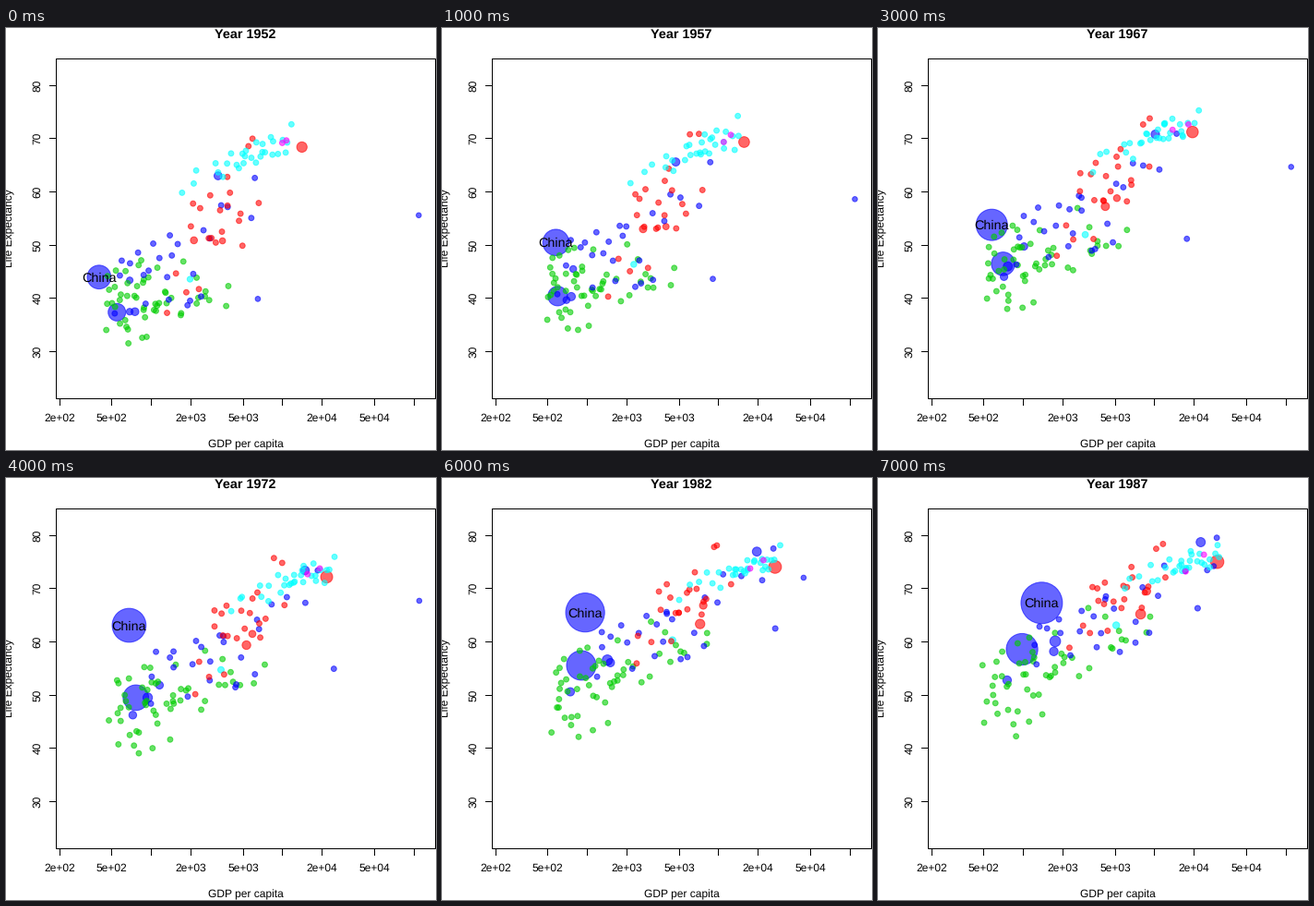
A matplotlib script for the animation above (8000 ms loop, 466 px wide and 457 px high).

```python
import numpy as np
import matplotlib.pyplot as plt
from matplotlib.animation import FuncAnimation

plt.rcParams["text.hinting"] = "none"

W, H, DPI = 466, 457, 100
PT = 72 / DPI
STEPS = 8
ALPHA = 0.6
SANS = "Liberation Sans"

COLORS = {
    "africa": (0, 205 / 255, 0),
    "americas": (1, 0, 0),
    "asia": (0, 0, 1),
    "europe": (0, 1, 1),
    "oceania": (1, 0, 1),
}

# continent, (first, last) population in millions, key points (step, GDP, life expectancy)
BUBBLES = [
    ("asia", (556, 1084), [(0, 400, 44), (1, 576, 50.5), (2, 488, 44.5),
                           (4, 677, 63.1), (6, 962, 65.5), (7, 1379, 67.3)]),
    ("asia", (372, 788), [(0, 547, 37.4), (7, 977, 58.6)]),
    ("americas", (157, 243), [(0, 13990, 68.4), (7, 29884, 75)]),
    ("asia", (86, 122), [(0, 3217, 63), (4, 14779, 73.4), (7, 22376, 78.7)]),
    ("asia", (82, 169), [(0, 750, 37.5), (3, 762, 46), (7, 1748, 60.1)]),
    ("americas", (57, 143), [(0, 2109, 50.9), (5, 6660, 61.5), (7, 7807, 65.2)]),
    ("americas", (30, 80), [(0, 3478, 50.8), (7, 8688, 69.5)]),
    ("asia", (41, 105), [(0, 685, 43.4), (7, 1705, 58.2)]),
    ("asia", (47, 104), [(0, 684, 37.5), (7, 752, 52.8)]),
    ("europe", (22, 53), [(0, 1969, 43.6), (7, 5089, 63.1)]),
    ("asia", (4, 15), [(0, 6460, 39.9), (5, 34168, 58.7), (7, 21198, 66.3)]),
    ("asia", (1, 2), [(0, 108382, 55.6), (4, 109348, 67.7), (7, 28118, 74.2)]),
]

# continent, count, skew, then (first, last) of: mean log GDP, its spread,
# mean life expectancy, its slope along GDP, its scatter
CROWDS = [
    ("africa", 52, 0.25, (2.99, 3.15), (0.25, 0.34), (39, 53.5), (1, 4.5), (4.3, 5)),
    ("asia", 25, 0.1, (3.18, 3.66), (0.3, 0.4), (47.5, 65), (4.5, 5), (5.5, 4)),
    ("americas", 22, 0, (3.5, 3.74), (0.2, 0.2), (53.5, 68.5), (5, 3.3), (5, 2.8)),
    ("europe", 29, -0.15, (3.74, 4.2), (0.23, 0.2), (65.8, 73.8), (3.2, 2.2), (1.7, 1.2)),
    ("oceania", 2, 0, (4.01, 4.31), (0.01, 0.03), (69.2, 75.3), (0.1, 0.8), (0.1, 0.2)),
]

rng = np.random.default_rng(1952)
steps = np.arange(STEPS)
t = steps / (STEPS - 1)


def to_x(log_gdp):
    return 58 + 142.4 * (log_gdp - np.log10(200))


def to_y(life):
    return 62 + 5.77 * (80 - life)


def to_radius(pop):
    return 2.75 + 0.0182 * pop


def mix(pair, p):
    return pair[0] + (pair[1] - pair[0]) * p


def crowd_tracks(count, skew, gdp, spread, life, slope, scatter):
    """Each member keeps its place in the cloud while the cloud drifts and widens."""
    gdp_ease = 1 - (1 - t) ** 1.5
    life_ease = 1 - (1 - t) ** 1.2
    u = np.linspace(-1, 1, count)
    for rank in 1.1 * u + 0.7 * u ** 3 + rng.normal(0, 0.08, count):
        rank += skew * (rank ** 2 - 1)
        off = np.clip(rng.normal(), -1.8, 1.8)
        log_gdp = mix(gdp, gdp_ease) + rank * mix(spread, t)
        age = mix(life, life_ease) + rank * mix(slope, t) + off * mix(scatter, t)
        yield (log_gdp + rng.normal(0, 0.02, STEPS),
               age + rng.normal(0, 0.4, STEPS))


tracks = []


def add(continent, log_gdp, life, pop):
    radius = to_radius(pop) * np.ones(STEPS)
    tracks.append((COLORS[continent], to_x(log_gdp), to_y(life), radius))


for continent, pop, keys in BUBBLES:
    at, gdp, life = np.array(keys).T
    add(continent, np.interp(steps, at, np.log10(gdp)),
        np.interp(steps, at, life), mix(pop, t))
for continent, *rule in CROWDS:
    for log_gdp, life in crowd_tracks(*rule):
        add(continent, log_gdp, life, 10)

xs, ys, radii = (np.array([track[k] for track in tracks]) for k in (1, 2, 3))
fills = [track[0] + (ALPHA,) for track in tracks]

fig = plt.figure(figsize=(W / DPI, H / DPI), dpi=DPI, facecolor="white")
ax = fig.add_axes([0, 0, 1, 1])
ax.set_xlim(0, W)
ax.set_ylim(H, 0)
ax.axis("off")


def line(px, py):
    ax.plot(px, py, color="black", lw=PT, solid_capstyle="projecting",
            solid_joinstyle="miter", snap=False, zorder=1)


def label(x, y, text, size=12, **kw):
    return ax.text(x, y, text, fontsize=size * PT, family=SANS, ha="center",
                   va="baseline", rotation_mode="anchor", zorder=5, **kw)


LEFT, RIGHT, TOP, BOTTOM = 54.5, 465.5, 33.5, 401.5
line([LEFT, RIGHT, RIGHT, LEFT, LEFT], [TOP, TOP, BOTTOM, BOTTOM, TOP])

for power in (2, 3, 4, 5):
    for digit in (1, 2, 5):
        value = digit * 10 ** power
        if not 200 <= value <= 100000:
            continue
        x = np.floor(to_x(np.log10(value)))
        line([x + 0.5, x + 0.5], [BOTTOM, BOTTOM + 7])
        if digit > 1:
            label(x, 426, f"{digit}e+{power:02d}")

for age in range(30, 90, 10):
    y = np.floor(to_y(age))
    line([LEFT - 7, LEFT], [y + 0.5, y + 0.5])
    label(37.5, y, str(age), rotation=90)

label(259.5, 455, "GDP per capita")
label(8, 217, "Life Expectancy", rotation=90)
title = label(259, 11, "", size=14.4, weight="bold")
name = label(0, 0, "China", size=14.4)

dots = ax.scatter(xs[:, 0], ys[:, 0], s=1, facecolors=fills, edgecolors=fills,
                  linewidths=PT, zorder=3)


def update(step):
    dots.set_offsets(np.column_stack([xs[:, step], ys[:, step]]))
    dots.set_sizes((2 * radii[:, step] * PT) ** 2)
    name.set_position((xs[0, step], ys[0, step] + 5))
    title.set_text(f"Year {1952 + 5 * step}")
    return dots, name, title


anim = FuncAnimation(fig, update, frames=STEPS, interval=1000, repeat=True)
plt.show()
```
